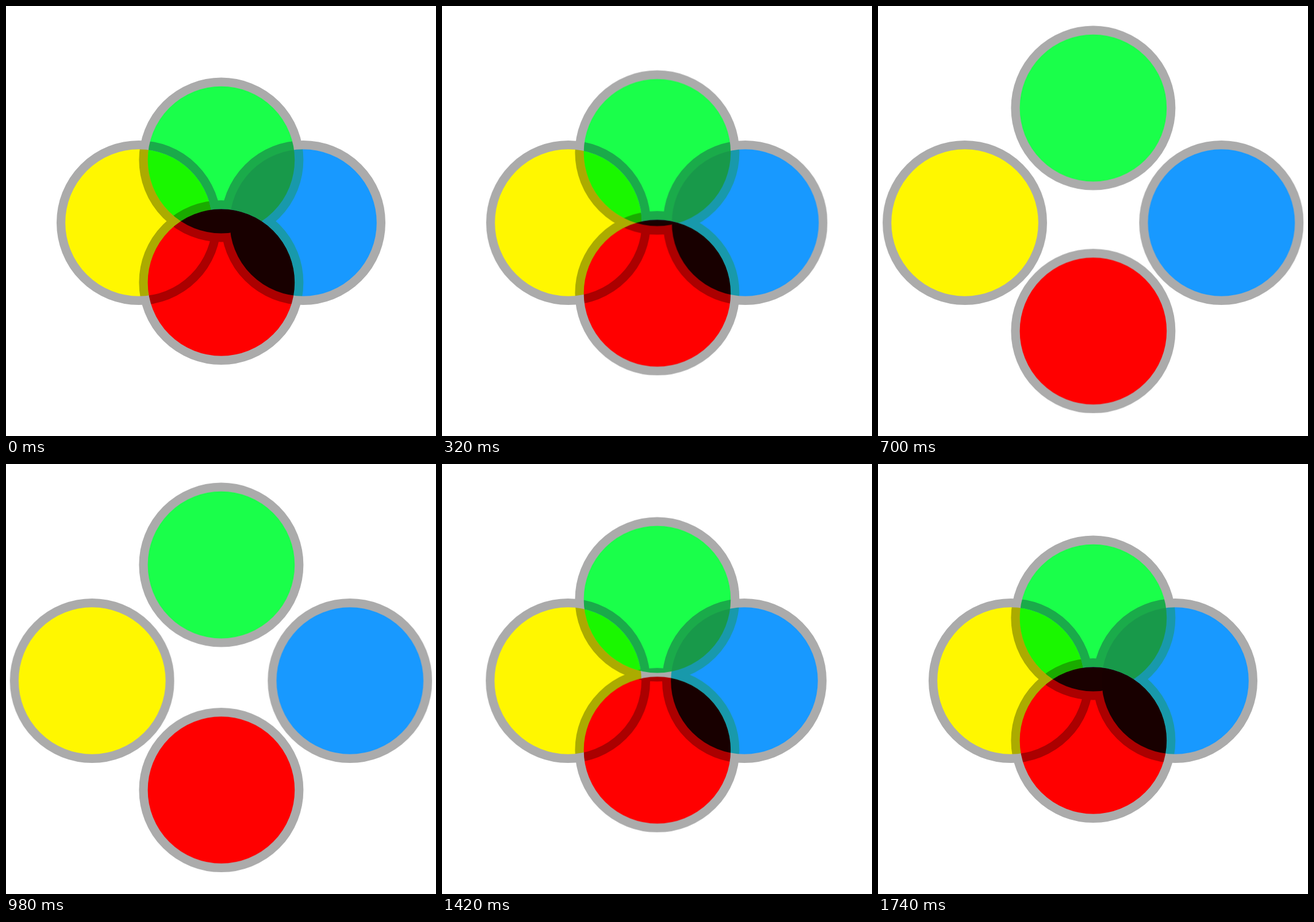
Write an HTML page that moves like this. It is 748x748 px and loops after 2400 ms.

```html
<!DOCTYPE html>
<html lang="en">
<head>
<meta charset="utf-8">
<title>Four overlapping circles</title>
<style>
  html, body {
    margin: 0;
    width: 100%;
    height: 100%;
    overflow: hidden;
    background: #fff;
  }

  svg {
    display: block;
    width: 100vw;
    height: 100vh;
    background: #fff;
    isolation: isolate;
  }

  circle {
    r: 135.4px;
    stroke: #ababab;
    stroke-width: 15.2px;
    mix-blend-mode: darken;
    animation: 2400ms linear infinite;
  }

  .yellow { fill: #fff700; animation-name: left; }
  .blue   { fill: #1899ff; animation-name: right; }
  .green  { fill: #1aff4a; animation-name: up; }
  .red    { fill: #f00;    animation-name: down; }

  /* Out until 870 ms, back until 1740 ms, then rest. */
  @keyframes left {
    0%         { transform: none; animation-timing-function: cubic-bezier(.812, 0, .19, 1); }
    36.25%     { transform: translateX(-82px); animation-timing-function: cubic-bezier(.822, 0, .206, 1); }
    72.5%, to  { transform: none; }
  }

  @keyframes right {
    0%         { transform: none; animation-timing-function: cubic-bezier(.855, 0, .094, 1); }
    36.25%     { transform: translateX(82px); animation-timing-function: cubic-bezier(.885, 0, .11, 1); }
    72.5%, to  { transform: none; }
  }

  @keyframes up {
    0%         { transform: none; animation-timing-function: cubic-bezier(.791, 0, .262, 1); }
    36.25%     { transform: translateY(-93px); animation-timing-function: cubic-bezier(.795, 0, .431, 1); }
    72.5%, to  { transform: none; }
  }

  @keyframes down {
    0%         { transform: none; animation-timing-function: cubic-bezier(.667, 0, .259, 1); }
    36.25%     { transform: translateY(87px); animation-timing-function: cubic-bezier(.789, 0, .292, 1); }
    72.5%, to  { transform: none; }
  }
</style>
</head>
<body>
<svg viewBox="0 0 748 748">
  <circle class="yellow" cx="231" cy="377"/>
  <circle class="blue" cx="517" cy="377"/>
  <circle class="green" cx="374.4" cy="267.6"/>
  <circle class="red" cx="374.4" cy="481"/>
</svg>
</body>
</html>
```
